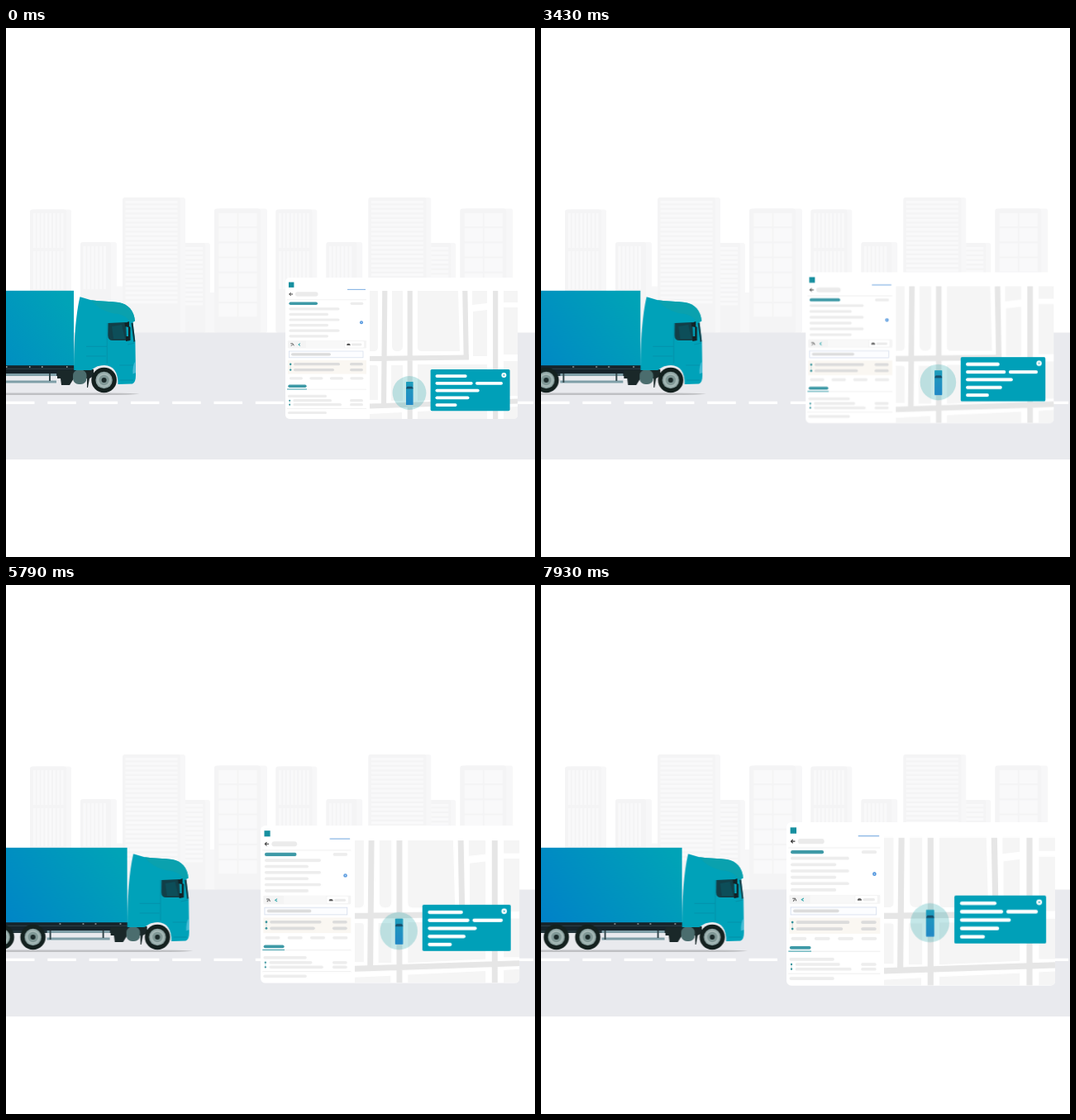
An HTML page that plays this animation: 640x640 px, repeating every 8 s.

```html
<!DOCTYPE html>
<html lang="en">
<head>
<meta charset="utf-8">
<title>Fleet tracking</title>
<style>
html, body { margin: 0; width: 100%; height: 100%; overflow: hidden; background: #fff; }
svg { display: block; width: 100vw; height: 100vh; }
#truck, #panel, #tracker { animation: 8s steps(112) -2ms infinite; }
#truck { animation-name: drive; }
#panel { animation-name: grow; transform-origin: 338px 302px; }
#tracker { animation-name: climb; }
@keyframes drive { to { transform: translateX(89.3px); } }
@keyframes grow { to { transform: translate(-41.4px, -15.2px) scale(1.158); } }
@keyframes climb { to { transform: translateY(-34.6px); } }
</style>
</head>
<body>
<svg viewBox="0 0 640 640">
  <defs>
    <linearGradient id="cargo" gradientUnits="userSpaceOnUse" x1="-78" y1="418" x2="66" y2="318">
      <stop offset="0" stop-color="#0082c8"/><stop offset="1" stop-color="#00a3b7"/>
    </linearGradient>
    <linearGradient id="mini" x1="0" y1="0" x2="0" y2="1">
      <stop offset="0" stop-color="#1d9dbb"/><stop offset="1" stop-color="#2288c6"/>
    </linearGradient>
    <clipPath id="mapClip"><path d="M440 318H619V468Q619 473 614 473H440Z"/></clipPath>
    <g id="city"></g>
    <g id="wheel">
      <circle r="15.3" fill="#14211f"/>
      <circle r="10.2" fill="#8da4a3"/>
      <circle r="8.6" fill="#a5b8b6"/>
      <circle r="6.2" fill="#7f9795"/>
      <circle r="3" fill="#1c2b2b"/>
    </g>
  </defs>

  <use href="#city"/>
  <use href="#city" x="297.3"/>
  <rect y="368.5" width="640" height="153.5" fill="#e9eaee"/>
  <path d="M0 453.4H640" stroke="#fff" stroke-width="3.4" stroke-dasharray="34.5 15.8"/>

  <g id="truck">
    <path d="M-140 441.5H120Q150 441.5 161.5 442.7Q150 444 120 444H-140Z" fill="#bfc0c3"/>
    <path d="M-140 408H84V418H-140Z" fill="#16232a"/>
    <path d="M-140 412.3H82" stroke="#31434a"/>
    <path d="M-140 418H66V421H-140Z" fill="#22343a"/>
    <path d="M-15 419.5H61M-15 428H61" stroke="#7f9fa8" stroke-width="3"/>
    <path d="M-11 418V429M53 418V427" stroke="#35494e" stroke-width="2"/>
    <path d="M62 414H82V424L77 432H67L66 424H62Z" fill="#1a2829"/>
    <path d="M84 413H106V421L101 424L99 435H98V424H84Z" fill="#1a2829"/>
    <rect x="81" y="413.5" width="16.5" height="17.5" rx="7" fill="#4b6d6e"/>
    <rect x="-140" y="317.8" width="222" height="90.4" fill="url(#cargo)"/>
    <path d="M89.5 325.3L103 329.3C115 331 126 330.5 136 332C148 334 155 342 156 354.5L153.5 356L156.4 379L157 420Q157 429 153 430.5L135.5 431C136 417 130 408 119 408C110 408 106 412 103 414H82.2C82 380 84.5 346 89.5 325.3Z" fill="#00a2b9"/>
    <path d="M103 329.3C115 331 126 330.5 136 332C148 334 155 342 156 354.5L150 355.5C145 347 137 346 128 345Q112 341 103 329.3Z" fill="#0aa1ae"/>
    <path d="M97 385.3H122M122.3 357V406M97 397H121M147 383L156 381M137 408H156" fill="none" stroke="#078ca4" stroke-width=".7"/>
    <path d="M123.5 357L145 356L146 378H129Q123.5 378 123.3 372Z" fill="#123f48"/>
    <path d="M128 361L140 359L144 376H130Z" fill="#0d4e59"/>
    <path d="M143.5 357L149 355V361L150.5 362V378L145 379V373H148V362L144 361Z" fill="#122226"/>
    <path d="M151.5 357L153.5 356.5L156.2 379L154.6 380Z" fill="#14333b"/>
    <path d="M156.5 403L157 417L153.5 418.5Q153 408 156.5 403Z" fill="#48bdd6"/>
    <path d="M138 426H154" stroke="#058ba3" stroke-width=".8"/>
    <path d="M0 410H1.5M28 410H29.5M43 410H44.5M73 410H74.5" stroke="#b2c0c0" stroke-width="1.4"/>
    <use href="#wheel" x="118.6" y="426"/>
    <use href="#wheel" x="-32" y="426"/>
    <use href="#wheel" x="-70" y="426"/>
  </g>

  <g id="panel">
    <rect x="338" y="302" width="281" height="171" rx="5" fill="#fff"/>
    <g clip-path="url(#mapClip)">
      <g fill="#f5f5f5">
        <path d="M440 318H450V386Q450 391 445 391H440ZM440 408H447Q450 408 450 411V450H440ZM440 467L479 465V473H440Z"/>
        <path d="M467 318H480V385Q480 391 473.5 391Q467 391 467 385ZM466 408H480V451H466Z"/>
        <path d="M498 318H547L549 391H503Q498 391 498 386ZM498 407H582V447L498 451ZM498 464L582 460V473H498Z"/>
        <path d="M564 318H582V333L564 335ZM565 343L582 341V397H565Z"/>
        <path d="M602 318H619V332H602ZM602 338H619V395H602ZM602 403H619V445H602ZM602 459L619 458V473H602Z"/>
      </g>
      <g fill="none" stroke="#e6e6e6" stroke-width="6.2">
        <path d="M458.3 318L457 458M488.7 318V473M555.3 318L556.8 401M592.2 318V473M440 400L560 398.5M440 457.5L619 451.5"/>
      </g>
    </g>
    <rect x="342" y="307.5" width="6.4" height="6.4" fill="#168f9f"/>
    <path d="M413 316.4H435" stroke="#86b4e4" stroke-width="1.1"/>
    <path d="M347 322H342.8M344.7 320L342.7 322L344.7 324" fill="none" stroke="#333" stroke-width=".9"/>
    <path d="M340 328.8H436M364 437.2H436M340 460.5H436" stroke="#efefef" stroke-width=".8"/>
    <circle cx="430" cy="356.2" r="2" fill="#4d93dd"/><circle cx="430" cy="356.2" r=".7" fill="#d9eafb"/>
    <rect x="341" y="378" width="95" height="9.4" rx="1.2" fill="#f4f4f4"/>
    <path d="M363 378.3H409V387H363Z" fill="#f8f8f8"/><rect x="410" y="379" width="23" height="7.4" rx="1" fill="#fff"/>
    <path d="M344.3 381.8H347L348.3 384.3M345 384.7L346.5 383" fill="none" stroke="#555" stroke-width=".9"/>
    <path d="M356 381.5L353.8 383L356 384.5" fill="none" stroke="#23a3a8" stroke-width=".9"/>
    <path d="M412.3 384V382.8L413.3 381.8H415.4L416.6 382.9V384Z" fill="#555"/>
    <rect x="342.4" y="391" width="89.6" height="7.8" fill="#fcfdff" stroke="#d3dcec" stroke-width=".7"/>
    <rect x="341" y="402" width="95" height="16.6" fill="#faf7f2"/>
    <path d="M344.2 407V413.5M343.2 450.8V455.6" stroke="#a7cfd2" stroke-width=".5"/>
    <path d="M340 437H364" stroke="#2d96a3" stroke-width=".9"/>
    <g id="bars"></g>

    <g id="tracker">
      <circle cx="488" cy="441.5" r="20.4" fill="#14a0a5" fill-opacity=".25"/>
      <rect x="484" y="428" width="8.6" height="28" rx=".6" fill="url(#mini)"/>
      <path d="M484.3 435.4L485.5 433.8H491.2L492.4 435.4V436.6H484.3Z" fill="#174e68"/>
      <rect x="513.6" y="413" width="96" height="50.2" rx="1.6" fill="#00a0b8"/>
      <circle cx="602.4" cy="420" r="3" fill="#fff"/>
      <path d="M601.4 419L603.4 421M603.4 419L601.4 421" stroke="#00a0b8" stroke-width=".7"/>
      <g id="cardBars"></g>
    </g>
  </g>
</svg>
<script>
const NS = "http://www.w3.org/2000/svg";
const byId = id => document.getElementById(id);

function rect(parent, x, y, width, height, fill, rx = 0) {
  const el = document.createElementNS(NS, "rect");
  for (const [key, value] of Object.entries({ x, y, width, height, fill, rx })) el.setAttribute(key, value);
  parent.append(el);
}

// Skyline
const city = byId("city"), FRONT = "#f4f4f5", SIDE = "#f7f7f8", PANE = "#f9f9fa", GROUND = 369;
function tower(x, y, front, side) {
  rect(city, x + 5, y, front + side - 5, GROUND - y, SIDE, 3);
  rect(city, x, y, front, GROUND - y, FRONT, 3);
}
rect(city, 122, 312.5, 22, 56.5, "#f7f7f8");
rect(city, 236, 320, 18, 49, "#f7f7f8");
tower(29, 219.5, 44, 6);
for (let i = 0; i < 8; i++) {
  rect(city, 33 + i * 4.8, 224, 2.8, 42, PANE);
  rect(city, 33 + i * 4.8, 270, 2.8, 46, PANE);
}
tower(90, 259, 37, 7);
for (let i = 0; i < 6; i++) rect(city, 93.5 + i * 4.9, 264, 3, 52, PANE);
tower(209, 260, 32, 6);
for (let i = 0; i < 13; i++) rect(city, 212, 265 + i * 5.6, 26, 3.2, PANE);
tower(141, 205, 70, 6);
for (let i = 0; i < 23; i++) rect(city, 144.5, 209 + i * 5.5, 63, 3.2, PANE);
tower(252, 218.5, 56, 8);
for (let i = 0; i < 7; i++) {
  rect(city, 257.5, 224 + i * 18.2, 22, 16, PANE);
  rect(city, 281.5, 224 + i * 18.2, 22, 16, PANE);
}

// Placeholder bars, given by left end, right end and middle line
const bars = byId("bars"), LIGHT = "#ededed", GREY = "#dcdcdc", TEAL = "#3d99a6";
const bar = (x1, x2, y, fill = LIGHT, h = 3.2, parent = bars) =>
  rect(parent, x1, y - h / 2, x2 - x1, h, fill, h / 2);

bar(350, 377.5, 322, "#ebebeb", 5.4);
bar(342.4, 377, 333.3, TEAL, 3.6);
bar(416.6, 432.3, 333.3);
for (let i = 0; i < 6; i++) bar(342.4, i % 2 ? 390 : 403.5, 339.8 + i * 6.6);
bar(418, 430.5, 383, "#ebebeb", 2.8);
bar(345, 393, 394.8, GREY);
for (const [y, end] of [[406.7, 404], [413.6, 397]]) {
  bar(348, end, y, GREY);
  bar(416, 432, y, GREY);
  bar(343, 345.4, y, "#2f8f98", 2.4);
}
for (let i = 0; i < 4; i++) bar(342.8 + i * 24.5, 359 + i * 24.5, 423.8);
bar(341.3, 363.6, 433.3, TEAL, 3.4);
bar(341, 388, 445.4);
for (const [y, end] of [[450.7, 394], [455.7, 406]]) {
  bar(347.3, end, y);
  bar(416, 432, y);
  bar(342.2, 344.2, y, "#2f8f98", 2);
}
bar(341, 388, 465.5);

const cardLines = [[519.5, 557.7, 0], [519.5, 564.7, 1], [568, 601, 1], [519.5, 572.7, 2], [519.5, 560.5, 3], [519.5, 545.6, 4]];
for (const [x1, x2, row] of cardLines) bar(x1, x2, 421.1 + row * 8.75, "#fff", 3.8, byId("cardBars"));
</script>
</body>
</html>
```
